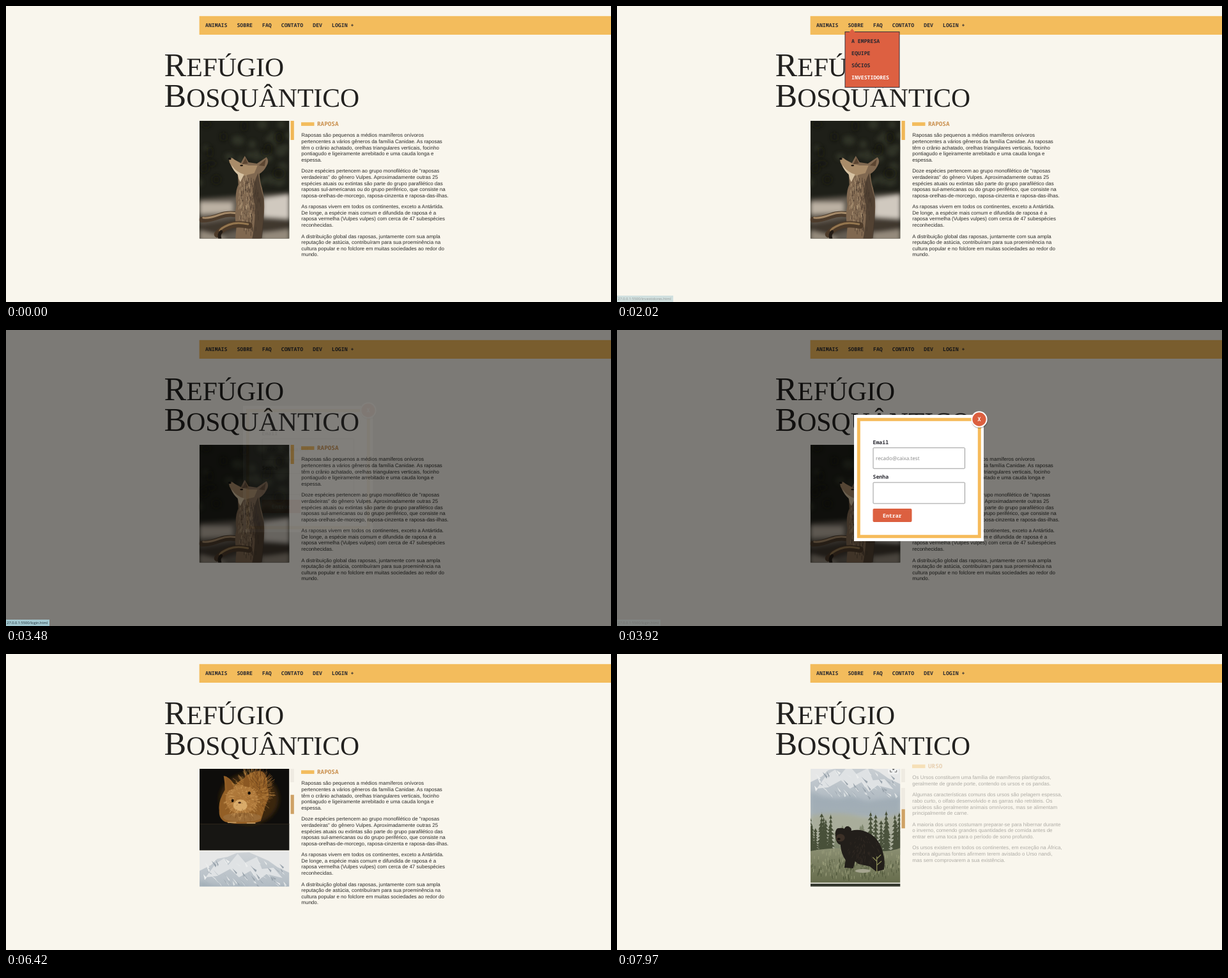
An HTML page for the animation above (8000 ms loop, 947 by 464 pixels).

```html
<!DOCTYPE html>
<html lang="pt-BR">
<head>
<meta charset="utf-8">
<title>Refúgio Bosquântico</title>
<style>
  html, body { margin: 0; height: 100%; overflow: hidden; background: #f9f6ed; }
  svg { display: block; text-rendering: geometricPrecision; }
  .mono { font: bold 8.2px "Noto Sans Mono", "DejaVu Sans Mono", monospace; fill: #282830; white-space: pre; }
  .title { font: 41.7px "Liberation Serif", serif; fill: #22211f; }
  .cap { font-size: 52px; }
  .tag { font-size: 9.3px; font-weight: 900; fill: #c98f4c; }
  .body { font: 8px "Liberation Sans", sans-serif; fill: #2d2c2a; }
  .hint { font: 8.1px "Open Sans", "Noto Sans", sans-serif; fill: #858585; }
  #status {
    position: absolute; left: -4px; bottom: 0; height: 10.5px; padding: 0 3px 0 2px;
    font: 5.7px/10.5px "Open Sans", "Noto Sans", sans-serif; white-space: nowrap;
    background: #a3c8d0; color: #1c2b33;
  }
</style>
</head>
<body>
<svg width="947" height="464" viewBox="0 0 947 464">
  <defs>
    <filter id="soft"><feGaussianBlur stdDeviation="3"/></filter>
    <filter id="fine"><feGaussianBlur stdDeviation=".7"/></filter>
    <linearGradient id="meadow" x2="0" y2="1">
      <stop stop-color="#8b8f72"/><stop offset="1" stop-color="#666c4c"/>
    </linearGradient>
    <linearGradient id="haze" x2="0" y2="1">
      <stop stop-color="#ccd1d5"/><stop offset=".5" stop-color="#b0bac2"/><stop offset="1" stop-color="#c2c5ba"/>
    </linearGradient>
    <g id="lens">
      <rect x="121.5" y="2.5" width="17" height="16" rx="3" fill="#fff" opacity=".4"/>
      <path d="M125 8v-3h3M132 5h3v3M135 12v3h-3M128 15h-3v-3" fill="none" stroke="#666"/>
      <circle cx="130" cy="10.3" r="1.7" fill="#666"/>
    </g>
  </defs>

  <rect width="947" height="464" fill="#f9f6ed"/>
  <rect x="302.6" y="15.8" width="645" height="29.2" fill="#f3bc5c"/>
  <g id="nav" class="mono"></g>
  <text class="title" x="247.5" y="110"><tspan class="cap">R</tspan>EFÚGIO</text>
  <text class="title" x="247.5" y="158"><tspan class="cap">B</tspan>OSQUÂNTICO</text>

  <svg x="302.7" y="180" width="140.7" height="184.5">
    <g id="reel">
      <svg id="fox" width="141" height="188.5"></svg>
      <svg id="squirrel" y="190" width="141" height="188.5"></svg>
      <svg id="bear" y="380" width="141" height="188.5"></svg>
      <rect y="570" width="141" height="188.5" fill="#33372d"/>
      <use id="foxLens" href="#lens"/>
      <use id="bearLens" href="#lens" y="380"/>
    </g>
  </svg>
  <rect id="track1" x="445" y="180" width="6" height="21" fill="#efebe2"/>
  <rect id="track2" x="445" y="210" width="6" height="33" fill="#efebe2"/>
  <rect id="thumb" x="445.5" width="5.3" height="30"/>

  <g id="raposa"></g>
  <g id="urso"></g>

  <g id="menu">
    <rect x="357" y="40.5" width="85" height="87" fill="#dd6041" stroke="#38303a"/>
    <path d="M363.5 41l4.5-5.5 4.5 5.5z" fill="#dd6041"/>
    <g id="items" class="mono"></g>
  </g>

  <g id="login">
    <rect width="947" height="464" opacity=".5"/>
    <g id="modal">
      <rect x="371" y="133" width="203" height="198" fill="#fff"/>
      <rect x="378.3" y="140.3" width="189" height="183.4" fill="none" stroke="#f6bb5a" stroke-width="5"/>
      <text class="mono" x="400.5" y="179">Email</text>
      <text class="mono" x="400.5" y="233">Senha</text>
      <g fill="#fff" stroke="#9a9a9a">
        <rect x="401" y="184.7" width="143.5" height="32.5" rx="1"/>
        <rect x="401" y="239" width="143.5" height="33" rx="1"/>
      </g>
      <text class="hint" x="405" y="204">recado@caixa.test</text>
      <rect x="400.5" y="280" width="61" height="21" rx="2" fill="#dc6040"/>
      <text class="mono" x="416" y="293.5" style="fill:#fff">Entrar</text>
      <circle cx="567.5" cy="141.5" r="13" opacity=".22"/>
      <circle cx="567" cy="140" r="11.7" fill="#dc6040" stroke="#fff" stroke-width="2"/>
      <text class="mono" x="567" y="143.4" text-anchor="middle" style="fill:#fff;font-size:9px">X</text>
    </g>
  </g>
</svg>
<div id="status"></div>

<script>
const $ = id => document.getElementById(id);
const clamp = p => Math.min(1, Math.max(0, p));
let seed = 7;
const rnd = (a = 0, b = 1) => a + (b - a) * ((seed = seed * 16807 % 2147483647) / 2147483647);

// ---- text ----
const label = (x, y, s) => `<text x="${x}" y="${y}">${s}</text>`;
const charW = 4.92;
let navX = 312;
$('nav').innerHTML = ['ANIMAIS', 'SOBRE', 'FAQ', 'CONTATO', 'DEV', 'LOGIN +'].map(s => {
  const out = label(navX, 33.3, s);
  navX += s.length * charW + 15;
  return out;
}).join('');
$('items').innerHTML = ['A EMPRESA', 'EQUIPE', 'SÓCIOS', 'INVESTIDORES']
  .map((s, i) => label(367, 58.2 + 19 * i, s)).join('');

function article(id, name, copy) {
  let y = 205.4;
  const lines = copy.trim().split('\n').map(s => {
    const out = s && label(462.3, y, s);
    y += s ? 9.6 : 7.9;
    return out;
  });
  $(id).innerHTML = `<rect x="462" y="182.3" width="20.5" height="5.6" fill="#f3bc5c"/>
    <text class="mono tag" x="487" y="188.2">${name}</text><g class="body">${lines.join('')}</g>`;
}
article('raposa', 'RAPOSA', `
Raposas são pequenos a médios mamíferos onívoros
pertencentes a vários gêneros da família Canidae. As raposas
têm o crânio achatado, orelhas triangulares verticais, focinho
pontiagudo e ligeiramente arrebitado e uma cauda longa e
espessa.

Doze espécies pertencem ao grupo monofilético de "raposas
verdadeiras" do gênero Vulpes. Aproximadamente outras 25
espécies atuais ou extintas são parte do grupo parafilético das
raposas sul-americanas ou do grupo periférico, que consiste na
raposa-orelhas-de-morcego, raposa-cinzenta e raposa-das-ilhas.

As raposas vivem em todos os continentes, exceto a Antártida.
De longe, a espécie mais comum e difundida de raposa é a
raposa vermelha (Vulpes vulpes) com cerca de 47 subespécies
reconhecidas.

A distribuição global das raposas, juntamente com sua ampla
reputação de astúcia, contribuíram para sua proeminência na
cultura popular e no folclore em muitas sociedades ao redor do
mundo.`);
article('urso', 'URSO', `
Os Ursos constituem uma família de mamíferos plantígrados,
geralmente de grande porte, contendo os ursos e os pandas.

Algumas características comuns dos ursos são pelagem espessa,
rabo curto, o olfato desenvolvido e as garras não retráteis. Os
ursídeos são geralmente animais omnívoros, mas se alimentam
principalmente de carne.

A maioria dos ursos costumam preparar-se para hibernar durante
o inverno, comendo grandes quantidades de comida antes de
entrar em uma toca para o período de sono profundo.

Os ursos existem em todos os continentes, em exceção na África,
embora algumas fontes afirmem terem avistado o Urso nandi,
mas sem comprovarem a sua existência.`);

// ---- pictures ----
const shape = (d, fill, more = '') => `<path d="${d}" fill="${fill}" ${more}/>`;
const line = (d, color, w, more = '') =>
  `<path d="${d}" fill="none" stroke="${color}" stroke-width="${w}" stroke-linecap="round" ${more}/>`;
const oval = (x, y, rx, ry, fill, more = '') =>
  `<ellipse cx="${x}" cy="${y}" rx="${rx}" ry="${ry}" fill="${fill}" ${more}/>`;
const soft = 'filter="url(#soft)"', fine = 'filter="url(#fine)"';

// Short strokes inside an ellipse, pointing outwards by `out` and down by `down`
function fur(n, x, y, rx, ry, out, down, color, w = 1) {
  let d = '';
  while (n--) {
    const a = rnd(0, 6.283), r = Math.sqrt(rnd()), c = Math.cos(a) * r, s = Math.sin(a) * r;
    d += `M${(x + rx * c).toFixed(1)} ${(y + ry * s).toFixed(1)}l${(out * c).toFixed(1)} ${(out * s + down).toFixed(1)}`;
  }
  return line(d, color, w, 'opacity=".6"');
}
function blots(n, x0, y0, x1, y1, size, color) {
  let s = '';
  while (n--) s += oval(rnd(x0, x1), rnd(y0, y1), rnd(.4, 1) * size, rnd(.4, 1) * size, color);
  return `<g ${soft} opacity=".8">${s}</g>`;
}
function trees(n, x0, x1, base, h, color) {
  let d = '';
  while (n--) {
    const x = rnd(x0, x1), t = h * rnd(.55, 1), w = t * .05;
    d += `M${x} ${base - t}l${w} ${t}h${-2 * w}z`;
    for (let k = .1; k < 1; k += .1) {
      const reach = t * .1 * k + rnd(1, 3);
      d += `M${x} ${base - t + t * k - 4}l${reach} 6h${-2 * reach}z`;
    }
  }
  return shape(d, color);
}

// The head is thrown back: muzzle up to the left, ears behind it
const foxBody = 'M46 59q4-3 9 2l10 5 6-11 6 10 13 2 15-10q5 6 0 14-4 8-11 12 1 14 4 22 6 26 2 48l-2 20-2 17H56l2-24q-4-16 0-34-3-20 3-32l-1-16q-9-8-12-18z';
$('fox').innerHTML = '<rect width="141" height="189" fill="#1e1f18"/>'
  + blots(26, 0, 0, 141, 105, 10, '#34372a') + blots(12, 0, 5, 141, 95, 9, '#161711')
  + `<g ${soft}>` + shape('M0 122L60 118 141 112V189H0z', '#655d52')
  + shape('M0 128H52V143L0 146z', '#bbb1a3') + shape('M100 122L141 116V153L100 150z', '#d0c9bf')
  + shape('M0 162L60 152 141 156V176L60 172 0 189z', '#3f382f')
  + shape('M0 172L40 182V189H0zM98 176L141 170V189H98z', '#948a7c') + '</g>'
  + `<g ${fine}>` + line('M68 149Q48 143 32 149T4 155', '#4d3c2c', 9) + line('M66 147Q48 141 32 147T6 152', '#a58a69', 3)
  + shape(foxBody, '#806850')
  + shape('M46 59q4-3 9 2l10 6 12 3 14 0-5 12-16 4-10-3q-9-8-13-18z', '#a98c69')
  + shape('M50 69q8 12 20 15l-6 12q-3-5-4-12-8-7-10-15z', '#d6c2a2')
  + shape('M72 58l4 9-9 1zM104 60l-2 11-9-1z', '#5b4531')
  + shape('M92 82q3 22 9 40l0 34-3 28-16 4q9-46 2-72 0-20 8-34z', '#43362a', 'opacity=".75"')
  + fur(110, 79, 132, 17, 44, 0, 6, '#41352a') + fur(80, 72, 126, 11, 42, 1, 5, '#c4ab88', .8)
  + line('M78 164Q58 160 46 165T28 178', '#4d3b2a', 10) + line('M76 162Q58 158 46 163T32 172', '#94764f', 3)
  + line('M34 174Q30 178 32 184', '#231c16', 5)
  + oval(47.5, 59.5, 2.4, 1.8, '#141210') + oval(66, 70, 2.4, 1.2, '#241a12') + '</g>';

$('squirrel').innerHTML = '<rect width="141" height="189" fill="#0e0d0b"/>'
  + '<rect y="147" width="141" height="42" fill="#171613"/>'
  + oval(78, 108, 46, 40, '#3b260e', soft)
  + `<g ${fine}>` + shape('M42 73q9 5 14 15 4-8 14-12 12-14 28-11 10 6 8 24 6 13-2 28l-8 26q-28 9-56 1-10-5-9-18-2-14 9-32 0-11-2-22z', '#935f26')
  + fur(200, 84, 96, 29, 32, 8, -1, '#b98442') + fur(110, 97, 92, 16, 28, 6, -3, '#68401b')
  + oval(66, 109, 25, 23, '#ae783a') + oval(64, 118, 11, 9, '#d9ab6a') + oval(67, 137, 30, 7, '#9a6c38')
  + fur(140, 66, 112, 25, 25, 4, 1, '#dbac68', .8) + fur(60, 68, 122, 25, 20, 3, 2, '#7d5122', .8)
  + shape('M42 74q9 7 12 18l-10 4q-3-10-2-22zM73 70q8 9 5 20l-9-2q-1-10 4-18z', '#8b5823')
  + oval(52, 111, 1.9, 2.4, '#120c07') + oval(78, 99, 2.3, 2.5, '#120c07') + oval(63, 114, 2.4, 1.6, '#482a19')
  + line('M45 145h12M75 146h12', '#b98d54', 2) + '</g>'
  + '<path d="M0 147.5h141" stroke="#2b241a"/>';

let snow = '', rock = '';
for (let i = 0; i < 60; i++) {
  const x = rnd(2, 135), y = rnd(12, 52);
  const piece = `M${x} ${y}l${rnd(3, 8)} ${rnd(3, 8)} ${rnd(-3, 4)} ${rnd(1, 4)}z`;
  if (i % 2) snow += piece; else rock += piece;
}
$('bear').innerHTML = '<rect width="141" height="189" fill="#e6e7e7"/>' + `<g ${fine}>`
  + shape('M0 31L18 22 28 12 44 9 58 3 78 2 92 8 108 15 122 25 141 34V120H0z', 'url(#haze)')
  + shape('M25 20l14-9 6 11 15-18 12 14 18-9 8 19 18-2 14 16-25-6-13 10-12-15-18 10-14-13-20 11-18 2z', '#dfe2e4')
  + shape(rock, '#9aa4ad') + shape(snow, '#eceeee')
  + shape('M0 46l18 7 24 4 22-4 25 8 52-8V87H0z', '#97a5af', `opacity=".6" ${soft}`)
  + shape('M0 84Q40 76 75 84T141 80V145H0z', '#a9ad9b', soft)
  + trees(16, 0, 141, 138, 42, '#7f876e')
  + trees(9, -2, 40, 143, 66, '#485039') + trees(9, 90, 143, 143, 76, '#4b533d')
  + shape('M0 139Q40 131 80 137T141 134V189H0z', 'url(#meadow)')
  + fur(170, 70, 160, 76, 24, 0, -4, '#a9ac88') + fur(130, 70, 168, 76, 18, 0, -4, '#434b31')
  + shape('M39 111q1-9 6-8 5-1 8 1 3-6 8-3 4 2 3 6 14-4 28 4 15 8 21 28 5 16 2 29l-12 3-10-8-18-4-5-4-3 11-14-1 2-12q-7-10-8-24-8-2-8-18z', '#221e1a')
  + oval(47, 118, 7, 6, '#3c3027') + oval(44.5, 120, 2.5, 1.8, '#15110e')
  + fur(80, 84, 136, 24, 22, 2, 3, '#3e342b', .8)
  + line('M104 172v-24m0 7l-6-6m6 2l6-6m-6 16l7-6', '#8b8c57', 1.3)
  + oval(82, 170, 12, 3, '#a6a590') + '</g>';

// ---- timeline ----
// CSS "ease": cubic-bezier(.25, .1, .25, 1)
function ease(p) {
  p = clamp(p);
  const bez = (a, b, u) => 3 * a * u * (1 - u) ** 2 + 3 * b * u * u * (1 - u) + u ** 3;
  let lo = 0, hi = 1;
  for (let i = 0; i < 18; i++) {
    const u = (lo + hi) / 2;
    if (bez(.25, .25, u) < p) lo = u; else hi = u;
  }
  return bez(.1, 1, lo);
}
const glide = p => (p = clamp(p), p * p * (3 - 2 * p));
const at = (steps, t) => steps.filter(s => s[0] <= t).pop()[1];
const show = (id, on) => $(id).setAttribute('visibility', on ? 'visible' : 'hidden');

function reveal(id, p, from) {
  const e = ease(p);
  $(id).setAttribute('opacity', e);
  $(id).setAttribute('transform', `translate(0 ${from * (1 - e)})`);
}

const hovers = [[0, -1], [1160, 0], [1330, 1], [1530, 2], [1770, 3], [2230, 2], [2300, 1], [2370, 0], [2510, -1]];
const pages = [[0, ''], [2020, 'investidores'], [2230, 'socios'], [2300, 'equipe'], [2370, 'empresa'],
  [2510, 'sobre'], [2850, 'contato'], [3050, ''], [3180, 'login'], [5460, '']];

function draw(t) {
  show('menu', t >= 500 && t < 2720);
  reveal('menu', (t - 480) / 300, 14);
  const hover = at(hovers, t);
  [...$('items').children].forEach((el, i) => el.style.fill = i === hover ? '#fff' : '');

  show('login', t >= 3480 && t < 5460);
  reveal('modal', (t - 3457) / 450, -14.5);

  const page = at(pages, t), status = $('status');
  status.hidden = !page;
  status.textContent = `127.0.0.1:5500/${page}.html`;
  status.style.opacity = t < 3480 ? clamp(.45 + (t - 2020) / 300) : 1 - .85 * clamp((t - 3480) / 440);

  const scroll = 251 * glide((t - 6080) / 340) + 139 * glide((t - 6930) / 350);
  $('reel').setAttribute('transform', `translate(0 ${-scroll})`);
  show('foxLens', t >= 5830);
  show('bearLens', t >= 7250);
  show('track1', t >= 6100);
  show('track2', t >= 6950);
  $('thumb').setAttribute('y', 180 + scroll * 185 / 1140);
  $('thumb').setAttribute('fill', t < 6100 ? '#f1b756' : '#cfa265');

  show('raposa', t < 7720);
  show('urso', t >= 7855);
  reveal('urso', (t - 7855) / 500, -14.3);
}

const start = performance.now();
function tick() {
  draw((performance.now() - start) % 8000);
  requestAnimationFrame(tick);
}
tick();
</script>
</body>
</html>
```
